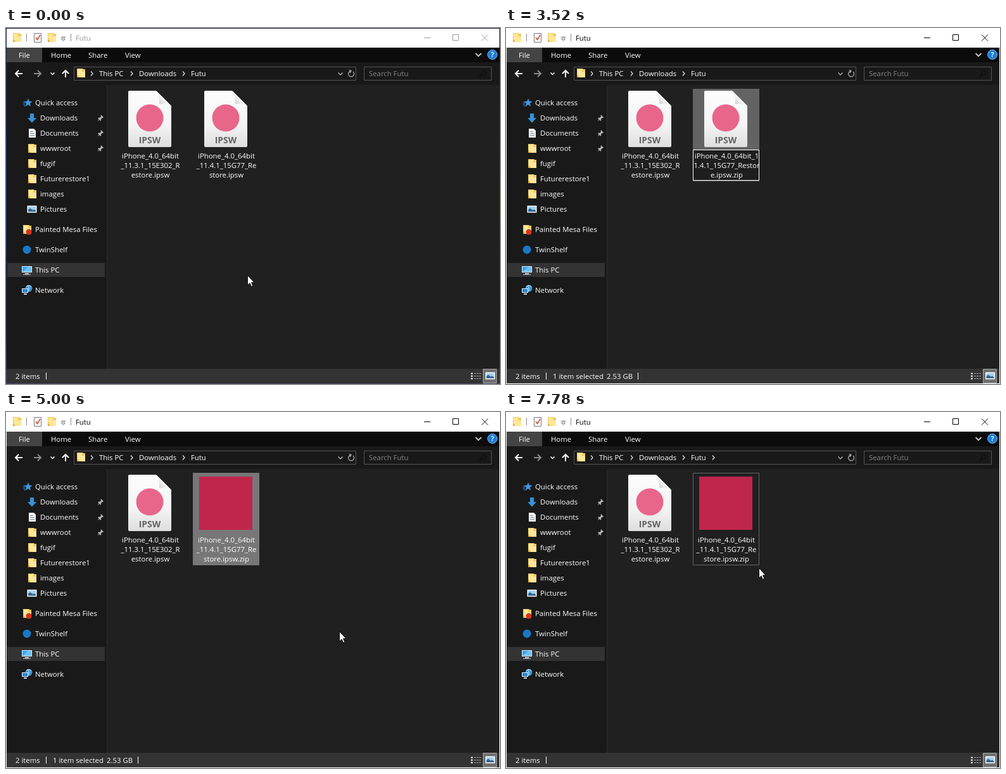
Write an HTML page that moves like this. It is 780 by 562 pixels and loops after 8580 ms.

```html
<!DOCTYPE html>
<html lang="en">
<head>
<meta charset="utf-8">
<title>Renaming a file extension</title>
<style>
html, body { margin: 0; width: 100%; height: 100%; overflow: hidden; background: #202020; }
svg { display: block; }
text { font: 11.35px "Open Sans", "Noto Sans", sans-serif; fill: #fff; white-space: pre; }
.mid { text-anchor: middle; }
.ink text { fill: #000; }
.cur { fill: currentColor; }
.line { fill: none; stroke: currentColor; }

/* a = hard state changes, move = pointer travel */
.a { animation: 8580ms step-end infinite; }
.move { animation: move 8580ms ease-in-out infinite; }
.invert { mix-blend-mode: difference; }
#dialog { transform-origin: 418.5px 291px; animation: dialog 8580ms linear infinite; }

@keyframes move {
  0%, 2.331% { transform: translate(381px, 390px); }
  4.895%, 17.716% { transform: translate(347px, 201px); }
  21.1%, 48.019% { transform: translate(374px, 234px); }
  52.681%, 55.2% { transform: translate(526px, 349.5px); }
  55.9%, 69.93% { transform: translate(526px, 346px); }
  71.795%, 81.702% { transform: translate(381px, 230px); }
  85.664%, 100% { transform: translate(399px, 246px); }
}
@keyframes arrow {
  0% { opacity: 1; } 15.385% { opacity: 0; } 43.473% { opacity: 1; }
  78.671% { opacity: 0; } 84.15% { opacity: 1; }
}
@keyframes beam {
  0% { opacity: 0; } 15.385% { opacity: 1; } 31.935% { opacity: 0; }
  78.671% { opacity: 1; } 84.15% { opacity: 0; }
}
@keyframes focus {
  0% { color: #999; } 7.343% { color: #000; } 43.473% { color: #999; } 54.779% { color: #000; }
}
@keyframes edge {
  0% { opacity: 0; } 7.343% { opacity: 1; } 43.473% { opacity: 0; } 54.779% { opacity: 1; }
}
@keyframes tile {
  0% { fill: #20202000; } 3.963% { fill: #4d4d4d; } 7.343% { fill: #777; }
  15.385% { fill: #636363; } 58.275% { fill: #777; } 78.671% { fill: #636363; }
  89.51% { fill: #20202000; }
}
@keyframes before { 0% { opacity: 1; } 58.275% { opacity: 0; } }
@keyframes after { 0% { opacity: 0; } 58.275% { opacity: 1; } }
@keyframes label {
  0% { opacity: 1; } 15.385% { opacity: 0; } 58.275% { opacity: 1; }
  78.671% { opacity: 0; } 89.51% { opacity: 1; }
}
@keyframes edit {
  0% { opacity: 0; } 15.385% { opacity: 1; } 41.375% { opacity: 0; }
  78.671% { opacity: 1; } 89.51% { opacity: 0; }
}
@keyframes commit { 0% { opacity: 0; } 41.375% { opacity: 1; } 58.275% { opacity: 0; } }
@keyframes pick {
  0% { opacity: 0; } 15.385% { opacity: 1; } 21.329% { opacity: 0; }
  78.671% { opacity: 1; } 89.51% { opacity: 0; }
}
@keyframes tail { 0% { x: 332px; width: 6px; } 58.275% { x: 322px; width: 34px; } }
@keyframes typed {
  0% { transform: translateY(0); } 31.935% { transform: translateY(-30px); }
  34.382% { transform: translateY(-60px); } 35.664% { transform: translateY(-90px); }
  37.063% { transform: translateY(-120px); }
}
@keyframes caret {
  0% { opacity: 0; x: 338px; } 15.385% { opacity: 1; x: 338px; } 19.464% { opacity: 0; x: 338px; }
  21.329% { opacity: 1; x: 365px; } 25.291% { opacity: 0; x: 365px; } 29.371% { opacity: 1; x: 365px; }
  31.935% { opacity: 1; x: 367px; } 34.382% { opacity: 1; x: 369px; }
  35.664% { opacity: 1; x: 371px; } 37.063% { opacity: 1; x: 375px; } 41.026% { opacity: 0; x: 375px; }
  78.904% { opacity: 1; x: 356px; } 82.984% { opacity: 0; x: 356px; }
  87.296% { opacity: 1; x: 356px; } 89.51% { opacity: 0; x: 356px; }
}
@keyframes picked { 0% { opacity: 0; } 8.275% { opacity: 1; } 90.093% { opacity: 0; } }
@keyframes tab { 0% { opacity: 0; } 59.557% { opacity: 1; } 90.676% { opacity: 0; } }
@keyframes title {
  0% { transform: none; } 59.557% { transform: translateX(291px); } 90.676% { transform: none; }
}
@keyframes crumb { 0% { opacity: 0; } 62.005% { opacity: 1; } }
@keyframes outline { 0% { opacity: 0; } 89.51% { opacity: 1; } }
@keyframes hover { 0% { opacity: 0; } 52.214% { opacity: 1; } }
@keyframes dots { 0% { opacity: 0; } 54.545% { opacity: 1; } }
@keyframes dialog {
  0% { opacity: 0; transform: scale(.95); }
  43.4% { opacity: 0; transform: scale(.95); animation-timing-function: cubic-bezier(.25, .46, .45, .94); }
  46.037% { opacity: 1; transform: none; }
  54.779% { opacity: 1; transform: none; animation-timing-function: ease-out; }
  57.11%, 100% { opacity: 0; transform: scale(.9); }
}
</style>
</head>
<body>
<svg width="780" height="562" viewBox="0 0 780 562">
<defs>
  <linearGradient id="sheet" x2="0" y2="1"><stop stop-color="#fdfdfd"/><stop offset=".6" stop-color="#f4f4f4"/><stop offset="1" stop-color="#dedede"/></linearGradient>
  <linearGradient id="fold" x1="1" y1="0" x2="0" y2="1"><stop offset=".45" stop-color="#fff"/><stop offset="1" stop-color="#b8b8b8"/></linearGradient>
  <linearGradient id="desk" x2="0" y2="1"><stop stop-color="#14183a"/><stop offset=".5" stop-color="#173a75"/><stop offset=".8" stop-color="#1b1b3c"/><stop offset="1" stop-color="#4a4466"/></linearGradient>
  <clipPath id="row"><rect x="296" y="223" width="103" height="17"/></clipPath>
  <g id="folder">
    <path d="M0 0h9l1 1h3v13H0z" fill="#f3cb62"/>
    <path d="M1 1h7v4h5v9H1z" fill="#ffe699"/>
    <path d="M0 14V9l4 5z" fill="#e0ad3e"/>
  </g>
  <g id="pin" fill="#b5b5b5"><path d="M6 0l4 4-1 1-1-.3-2 2 .2 2-1 1L1 5.500l1-1 2 .2 2-2L5.500 1z"/><path d="M3 6.500l1 1L.5 10.500z"/></g>
  <path id="next" d="M0 0l3 3.500-3 3.500" fill="none" stroke="#ddd" stroke-width="1.300"/>
  <g id="photo">
    <path d="M0 0h15v11H0z" fill="#fff"/><path d="M1.500 1.500h12v8h-12z" fill="#9bd0f5"/>
    <path d="M1.500 9.500V6l3-2 4 3 2-1 3 1.500v2z" fill="#31658f"/>
  </g>
  <g id="package">
    <path d="M195 99h42l24 24v63q0 2-2 2h-64q-2 0-2-2v-85q0-2 2-2z" fill="url(#sheet)"/>
    <path d="M237 99l24 24q-8-5-19-3 1-13-5-21z" fill="url(#fold)"/>
    <circle cx="227" cy="142" r="21.500" fill="#e8668a"/>
    <text class="mid" x="227" y="182" style="font-size:14px;font-weight:700;fill:#636363">IPSW</text>
  </g>
</defs>

<!-- window -->
<rect width="780" height="562" fill="url(#desk)"/>
<rect class="a" style="animation-name:edge" width="780" height="562" fill="#fff"/>
<rect x="1" y="1" width="778" height="30" fill="#fff"/>
<rect x="1" y="31" width="778" height="23" fill="#0b0b0b"/>
<rect x="1" y="54" width="778" height="484" fill="#191919"/>
<rect x="159" y="90" width="620" height="448" fill="#202020"/>
<path d="M159.500 90v448" stroke="#2d2d2d"/>
<rect x="1" y="538" width="778" height="23" fill="#333"/>

<!-- title bar -->
<use href="#folder" x="11" y="8"/>
<path d="M32.500 9v12M102.500 9v12" stroke="#8a8a8a"/>
<path d="M44.500 8.500h11v14h-11z" fill="#fff" stroke="#777"/>
<path d="M47 15l2.500 3.500L54 11" fill="none" stroke="#cf4a32" stroke-width="1.600"/>
<use href="#folder" x="66" y="8"/>
<path d="M87 14.500h7" stroke="#555"/><path d="M87.500 17h6l-3 3.500z" fill="none" stroke="#555" stroke-width=".8"/>
<g class="a" style="animation-name:tab">
  <rect x="230" y="4" width="158" height="27" fill="#ffc3e1"/>
  <rect x="230" y="31" width="158" height="23" fill="#111"/>
  <g class="ink"><text class="mid" x="309" y="22">Extract</text></g>
  <text class="mid" x="308" y="47" style="font-size:11px">Compressed Folder Tools</text>
</g>
<g class="a" style="animation-name:focus">
  <g class="a" style="animation-name:title"><text class="cur" style="fill:currentColor" x="110" y="20">Futu</text></g>
  <path class="line" d="M660 15.500h10M705.500 10.500h9v9h-9zM751 10.500l10 10M761 10.500l-10 10"/>
</g>

<!-- ribbon -->
<rect x="1" y="31" width="56" height="23" fill="#444"/>
<text x="20" y="47">File</text><text x="71" y="47">Home</text><text x="130" y="47">Share</text><text x="188" y="47">View</text>
<path d="M741.500 40l4.500 4.500 4.500-4.500" fill="none" stroke="#ccc" stroke-width="1.800"/>
<circle cx="768" cy="42" r="7.500" fill="#1d7fd8" stroke="#9ccbf3" stroke-width=".8"/>
<text class="mid" x="768" y="46" style="font-weight:600">?</text>

<!-- address row -->
<g fill="none" stroke="#fff" stroke-width="2">
  <path d="M26 72H15M20 67l-5 5 5 5"/>
  <path d="M44 72h11M50 67l5 5-5 5" stroke="#8b8b8b"/>
  <path d="M70.500 70.500l3 3 3-3" stroke-width="1.500"/>
  <path d="M94 78V67M89 72l5-5 5 5"/>
</g>
<g fill="none" stroke="#555">
  <path d="M107.500 61.500h445v21h-445zM565.500 61.500h201v21h-201z"/>
  <path d="M524.500 70.500l3.500 3.500 3.500-3.500" stroke="#aaa" stroke-width="1.500"/>
  <path d="M548 69a4.500 4.500 0 1 1-4-1M542 66l3 1.800-2 3" stroke="#aaa" stroke-width="1.300"/>
  <circle cx="754" cy="70.500" r="3.500" stroke="#0a0a0a"/><path d="M751.500 73l-4 4" stroke="#0a0a0a" stroke-width="1.500"/>
</g>
<use href="#folder" x="112" y="64"/>
<use href="#next" x="134" y="68.500"/><text x="147" y="76">This PC</text>
<use href="#next" x="197" y="68.500"/><text x="210" y="76">Downloads</text>
<use href="#next" x="279" y="68.500"/><text x="292" y="76">Futu</text>
<g class="a" style="animation-name:crumb"><use href="#next" x="326" y="68.500"/></g>
<text x="573" y="76" style="fill:#858585">Search Futu</text>

<!-- sidebar -->
<rect x="2" y="371" width="154" height="22" fill="#333"/>
<path d="M35 111l1.700 4.700 5 .2-4 3 1.400 4.900-4.100-2.900-4.200 2.900 1.500-4.800-4-3.100 5-.2z" fill="#3c9ce6"/>
<path d="M27 117h4M26.500 120h4M28 123h3" stroke="#3c9ce6"/>
<path d="M38 135h6v7h4l-7 7.500-7-7.500h4z" fill="#3592dc"/>
<path d="M36 159h8l3 3v11H36z" fill="#f5f5f5"/><path d="M38 163.500h5M38 166.500h7M38 169.500h7" stroke="#6f8ea8"/>
<use href="#folder" x="35" y="183"/><use href="#folder" x="35" y="207"/>
<use href="#folder" x="35" y="231"/><use href="#folder" x="35" y="255"/>
<use href="#photo" x="33.500" y="280.500"/>
<use href="#folder" x="27" y="311"/><circle cx="36" cy="322" r="4.500" fill="#d3321f"/>
<circle cx="33" cy="350" r="6.500" fill="#1a78c8"/>
<path d="M25 376h16v10H25z" fill="#dceefa"/><path d="M26 377h14v8H26z" fill="#39a3ec"/><path d="M26 385l9-8h5v8z" fill="#6fc1f6"/><path d="M30 387h6v1.500h3v1H27v-1h3z" fill="#c5d3dc"/>
<circle cx="36" cy="411" r="5.500" fill="#3b93d6"/><path d="M32 409q4-5 8 0M34 406q4 4 2 10" fill="none" stroke="#bfe2f8"/>
<path d="M25 411h10v7H25z" fill="#dceefa"/><path d="M26 412h8v5h-8z" fill="#2d82c8"/><path d="M28 419h5v2h-5z" fill="#c5d3dc"/>
<use href="#pin" x="144" y="137"/><use href="#pin" x="144" y="161"/><use href="#pin" x="144" y="185"/>
<text x="46" y="122">Quick access</text>
<text x="54" y="146">Downloads</text>
<text x="54" y="170">Documents</text>
<text x="54" y="194">wwwroot</text>
<text x="54" y="218">fugif</text>
<text x="54" y="242">Futurerestore1</text>
<text x="54" y="266">images</text>
<text x="54" y="290">Pictures</text>
<text x="46" y="322">Painted Mesa Files</text>
<text x="46" y="354">TwinShelf</text>
<text x="46" y="386">This PC</text>
<text x="46" y="418">Network</text>

<!-- status bar -->
<text x="15" y="554">2 items</text>
<path d="M63.500 544v11" stroke="#fff"/>
<g class="a" style="animation-name:picked">
  <text x="74" y="554">1 item selected</text><text x="159" y="554">2.53 GB</text>
  <path d="M208.500 544v11" stroke="#fff"/>
</g>
<path d="M734 545.500h3M734 549.500h3M734 553.500h3" stroke="#fff" stroke-width="2"/>
<path d="M739 545.500h11M739 549.500h11M739 553.500h11" stroke="#aaa" stroke-dasharray="3 1"/>
<path d="M753.500 538.500h21v22h-21z" fill="#6f6f6f" stroke="#a5a5a5"/>
<use href="#photo" x="757" y="543.500"/>

<!-- files -->
<use href="#package"/>
<g class="mid">
  <text x="228" y="206">iPhone_4.0_64bit</text>
  <text x="228" y="221">_11.3.1_15E302_R</text>
  <text x="228" y="236">estore.ipsw</text>
</g>
<rect class="a" style="animation-name:tile" x="295" y="96" width="105" height="146"/>
<path class="a" style="animation-name:outline" d="M295.500 96.500h104v145h-104z" fill="none" stroke="#666"/>
<g class="a" style="animation-name:before"><use href="#package" x="120"/></g>
<g class="a" style="animation-name:after"><rect x="305" y="102" width="84" height="84" fill="#c0264c"/></g>
<g class="a mid" style="animation-name:label">
  <text x="348" y="206">iPhone_4.0_64bit</text>
  <text x="348" y="221">_11.4.1_15G77_Re</text>
  <text class="a" style="animation-name:before" x="348" y="236">store.ipsw</text>
  <text class="a" style="animation-name:after" x="348" y="236">store.ipsw.zip</text>
</g>

<!-- name editor -->
<g class="a mid" style="animation-name:edit">
  <path d="M295.500 192.500h104v48h-104z" fill="#1e1e1e" stroke="#fff"/>
  <g class="a" style="animation-name:pick" fill="#0078d7">
    <path d="M299 194h100v30H299z"/>
    <rect class="a" style="animation-name:tail" x="332" y="224" width="6" height="15"/>
  </g>
  <text x="348.500" y="206">iPhone_4.0_64bit_1</text>
  <text x="348.500" y="221">1.4.1_15G77_Restor</text>
  <g clip-path="url(#row)">
    <g class="a" style="animation-name:typed">
      <text x="348.500" y="236">e.ipsw</text>
      <text x="348.500" y="266">e.ipsw.</text>
      <text x="348.500" y="296">e.ipsw.z</text>
      <text x="348.500" y="326">e.ipsw.zi</text>
      <text x="348.500" y="356">e.ipsw.zip</text>
    </g>
  </g>
</g>
<rect class="a invert" style="animation-name:caret" y="224" width="1" height="15" fill="#fff"/>
<g class="a mid" style="animation-name:commit">
  <path d="M295.500 192.500h104v63h-104z" fill="#1e1e1e" stroke="#fff"/>
  <text x="348" y="206">iPhone_4.0_64bit_</text>
  <text x="348" y="221">_11.4.1_15G77_Rest</text>
  <text x="348" y="236">ore.ipsw.zip</text>
</g>

<!-- dialog -->
<g id="dialog" class="ink">
  <rect x="201" y="218" width="435" height="146" fill="#fff" style="filter:drop-shadow(0 3px 5px #000a)"/>
  <rect x="201" y="323" width="435" height="41" fill="#f0f0f0"/>
  <path d="M201 323.500h435" stroke="#dfdfdf"/>
  <text x="209" y="237">Rename</text>
  <path d="M227 259l16 31h-32z" fill="#ffdc00" stroke="#e8c400" stroke-width=".8" stroke-linejoin="round"/>
  <path d="M225.800 270h2.400l-.5 11h-1.400z"/><circle cx="227" cy="284.500" r="1.400"/>
  <text x="253" y="275">If you change a file name extension, the file might become unusable.</text>
  <text x="253" y="305">Are you sure you want to change it?</text>
  <path d="M486 334h64v19h-64z" fill="#e1e1e1" stroke="#0078d7" stroke-width="2"/>
  <g class="a" style="animation-name:hover">
    <path d="M485.500 333.500h65v20h-65z" fill="#e5f1fb" stroke="#0078d7"/>
  </g>
  <path class="a" style="animation-name:dots" d="M487.500 335.500h61v16h-61z" fill="none" stroke="#000" stroke-dasharray="1 1"/>
  <path d="M559.500 333.500h65v20h-65z" fill="#e1e1e1" stroke="#adadad"/>
  <text class="mid" x="517.500" y="348"><tspan text-decoration="underline">Y</tspan>es</text>
  <text class="mid" x="592" y="348"><tspan text-decoration="underline">N</tspan>o</text>
</g>

<!-- pointer -->
<g class="move">
  <path class="a" style="animation-name:arrow" d="M.5.5v15.500l3.500-3.300 2.500 5.500 2.400-1-2.400-5.400h4.500z" fill="#fff" stroke="#000" stroke-width=".9"/>
</g>
<g class="move invert">
  <path class="a" style="animation-name:beam" d="M-3-6.500h2.500M.500-6.500H4M-3 7.500h2.500M.500 7.500H4M.500-6v13" fill="none" stroke="#fff"/>
</g>
</svg>
</body>
</html>
```
